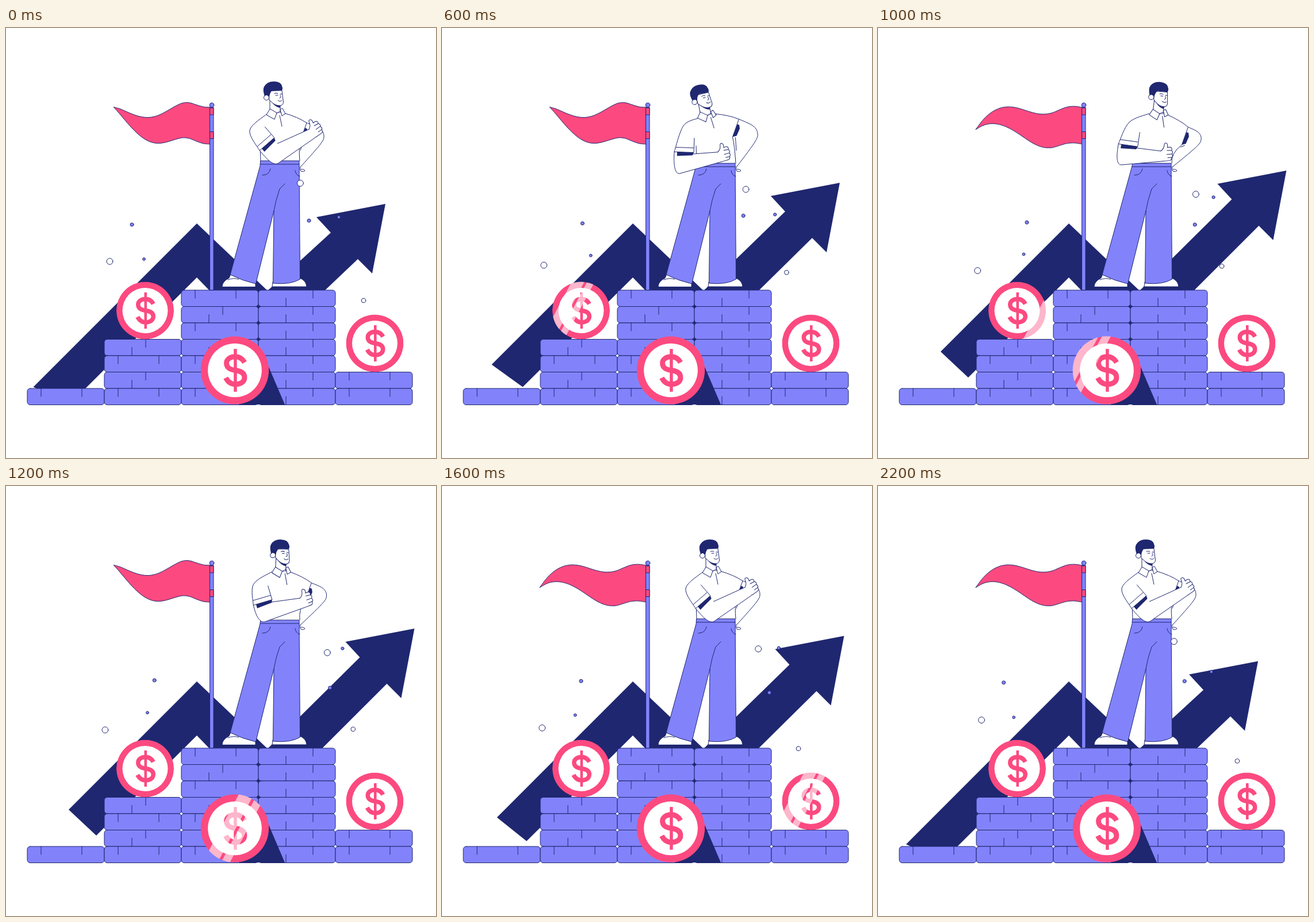
An HTML page that plays this animation: 748x748 px, repeating every 2300 ms.

```html
<!DOCTYPE html>
<html lang="en">
<head>
<meta charset="utf-8">
<title>Success podium</title>
<style>
  html, body { margin: 0; width: 100%; height: 100%; overflow: hidden; background: #fff; }
  svg { display: block; width: 100vw; height: 100vh; }
</style>
</head>
<body>
<svg id="stage" viewBox="0 0 748 748" stroke-linejoin="round" stroke-linecap="round"></svg>
<script>
const NAVY = '#1f2770', BLUE = '#8283fb', PINK = '#fc4a80', WHITE = '#fff';
const LOOP = 2300, STEP = 100, TAU = Math.PI * 2;
const stage = document.getElementById('stage');

function add(tag, attrs, parent = stage) {
  const el = document.createElementNS('http://www.w3.org/2000/svg', tag);
  for (const name in attrs) el.setAttribute(name, attrs[name]);
  parent.appendChild(el);
  return el;
}
const shape = (fill, d = '', parent = stage) => add('path', { fill, d, stroke: NAVY }, parent);
const solid = (fill, d = '', parent = stage) => add('path', { fill, d }, parent);
const line = (d = '', parent = stage) => shape('none', d, parent);
const draw = (el, d) => el.setAttribute('d', d);
const move = (el, [x, y], angle = 0) =>
  el.setAttribute('transform', `translate(${x} ${y}) rotate(${angle})`);

const mix = (a, b, k) => [a[0] + (b[0] - a[0]) * k, a[1] + (b[1] - a[1]) * k];
const plus = (a, b, k = 1) => [a[0] + b[0] * k, a[1] + b[1] * k];
function turn([x, y], degrees) {
  const a = degrees * TAU / 360, c = Math.cos(a), s = Math.sin(a);
  return [x * c - y * s, x * s + y * c];
}
function smooth(t, from, length) {
  const u = Math.min(1, Math.max(0, (t - from) / length));
  return u * u * u * (10 + u * (6 * u - 15));
}

// Periodic monotone cubic through keyed values.
function ease(values, times, t) {
  const n = times.length;
  const time = i => times[(i + n) % n] + Math.floor(i / n) * LOOP;
  const value = i => values[(i + n) % n];
  const rate = i => (value(i + 1) - value(i)) / (time(i + 1) - time(i));
  const slope = i => {
    const a = rate(i - 1), b = rate(i);
    return a * b <= 0 ? 0 : 2 * a * b / (a + b);
  };
  let i = n - 1;
  while (times[i] > t) i--;
  const h = time(i + 1) - time(i), u = (t - time(i)) / h, v = 1 - u;
  return v * v * (1 + 2 * u) * value(i) + u * u * (3 - 2 * u) * value(i + 1)
    + h * u * v * (v * slope(i) - u * slope(i + 1));
}

// Smooth curve through points, continuing from the first one.
function curve(points) {
  let d = '';
  for (let i = 0; i < points.length - 1; i++) {
    const a = points[i], b = points[i + 1];
    const before = points[i - 1] || a, after = points[i + 2] || b;
    const c1 = plus(a, plus(b, before, -1), 1 / 6);
    const c2 = plus(b, plus(after, a, -1), -1 / 6);
    d += `C${c1} ${c2} ${b}`;
  }
  return d;
}

/* Arrow: stretches up to the right, then shrinks back */
const HEAD = [[565, 356], [540, 329], [660, 306], [637, 427], [612, 402]];
const arrow = solid(NAVY);
function drawArrow(t) {
  const k = smooth(t, 0, 1050) - smooth(t, 1210, 1150);
  const head = HEAD.map(p => plus(p, [50.5, -58], k));
  const tailTop = plus([47.5, 624.5], [61.5, -61.5], k);
  const tailLow = plus([112, 653], [45, -45], k);
  draw(arrow, `M${[tailTop, [332, 340], [455, 457], ...head, [450, 556], [332, 434], tailLow].join('L')}Z`);
}

/* Bricks */
[1, 4, 7, 7, 2].forEach((count, column) => {
  const x = 37 + column * 134;
  for (let row = 7 - count; row < 7; row++) {
    const y = 456 + row * 28.5;
    add('rect', { x, y, width: 134, height: 28.5, rx: 5, fill: BLUE, stroke: NAVY });
    const top = dx => `M${x + dx} ${y}v14`;
    const bottom = dx => `M${x + dx} ${y + 14}v14`;
    if (column === 3) line(top(95) + bottom(48));
    else line(row % 2 && column < 4 ? bottom(48) + top(72) : top(24) + top(95));
  }
});
solid(NAVY, 'M452 578L485 655H405Z');

/* Coins, each crossed in turn by a slanted shine */
const DOLLAR = 'M13.5-11.5C10-18 5-20 0-20C-8-20-13-16-13-10.5C-13-3-7-1 0 0'
  + 'C8 1 13.5 4 13.5 10.5C13.5 16.5 8 20.5 0 20.5C-7 20.5-11 17-14 11';
add('circle', { r: 50 }, add('clipPath', { id: 'coin' }));
function makeCoin(x, y, r) {
  const coin = add('g', { transform: `translate(${x} ${y}) scale(${r / 50})`, 'clip-path': 'url(#coin)' });
  add('circle', { r: 50, fill: PINK }, coin);
  add('circle', { r: 39.5, fill: WHITE }, coin);
  const sign = add('g', { transform: 'translate(.8 0)', fill: 'none', stroke: PINK, 'stroke-linecap': 'butt' }, coin);
  add('path', { d: DOLLAR, 'stroke-width': 7.5 }, sign);
  add('path', { d: 'M0-31.5V31.5', 'stroke-width': 4.6 }, sign);
  return add('path', { d: 'M0-60V60H-13V-60ZM-18-60V60H-40V-60Z', fill: WHITE, opacity: .6 }, coin);
}
const shines = [makeCoin(242, 491.5, 50), makeCoin(398, 595.5, 59.3), makeCoin(641.5, 548.5, 50)];
function drawShines(t) {
  shines.forEach((shine, i) => {
    const x = -43 + .2 * (t - 400 - i * 488);
    shine.setAttribute('transform', `skewX(-28) translate(${x} 0)`);
  });
}

/* Flag: a wave running from the pole to the tip */
const flag = shape(PINK);
add('rect', { x: 355, y: 138, width: 6, height: 318, fill: BLUE, stroke: NAVY });
for (const y of [139, 180.5]) add('rect', { x: 355, y, width: 6, height: 12, fill: PINK, stroke: NAVY });
add('circle', { cx: 358, cy: 134, r: 3.8, fill: BLUE, stroke: NAVY });
function drawFlag(t) {
  const phase = t / 600, top = [], bottom = [], parts = 14;
  const tip = 178.5 + 10 * Math.cos(TAU * phase - Math.PI / 6);
  for (let i = 0; i <= parts; i++) {
    const u = i / parts, x = 355 + (tip - 355) * u;
    const swing = 10 * Math.min(1, 4 * u) + 14 * u ** 8;
    const y = 170 - 9 * u * u - swing * Math.cos(TAU * ((u - .22) / .757 - phase));
    const half = 32 * (1 - u ** 2.3);
    top.push([x, y - half]);
    bottom.unshift([x, y + half]);
  }
  draw(flag, `M${top[0]}${curve(top)}${curve(bottom)}Z`);
}

/* Man: a few joints per pose, the rest is derived from them */
const crossed = {
  collar: [470, 147], shoulder: [424, 178], cuff: [454, 202], elbow: [474, 235],
  hand: [537, 173], farElbow: [553, 188], lean: [0], cuffTilt: [-41]
};
const lowered = {
  collar: [458, 154], shoulder: [416, 184], cuff: [435, 217], elbow: [442, 259],
  hand: [508, 208], farElbow: [546, 182], lean: [-14], cuffTilt: [-16]
};
const leaning = {
  collar: [461, 151], shoulder: [420, 170], cuff: [421, 216], elbow: [414, 253],
  hand: [490, 216], farElbow: [549, 184], lean: [-11], cuffTilt: [2]
};
const upright = {
  collar: [489, 148], shoulder: [437, 164], cuff: [435, 204], elbow: [424, 238],
  hand: [502, 216], farElbow: [562, 194], lean: [7], cuffTilt: [8]
};
const POSES = [crossed, lowered, leaning, upright, crossed];
const POSE_TIMES = [0, 400, 600, 1000, 1400];
const HIP = [513, 241];

shape(WHITE, 'M376 450Q376 441 388 435L391 428L434 443L434 450Z');
line('M386 438Q395 434 405 437');
shape(WHITE, 'M464 442L463 450H523Q522 439 511 435Z');

const farArm = shape(WHITE), farInner = line();
shape(WHITE, 'M512 241Q511 247 513 249Q518 251 520 248Q518 245 513 246');
const headGroup = add('g', {});
const torso = solid(WHITE), torsoSides = line(), farShade = solid(NAVY);
const trousers = shape(BLUE), belt = line();
line('M485 271L476 280Q469 300 466 318');
line('M446 256Q458 256 460 245M503 248Q504 256 511 258');
const collarGroup = add('g', {});
const forearm = shape(WHITE), sleeve = shape(WHITE), hem = line(), shade = solid(NAVY);
const handGroup = add('g', {});

shape(WHITE, 'M-5 8V33H13V18', headGroup);
solid(NAVY, 'M-1 15Q6 21 13 20V24Q4 22-1 15Z', headGroup);
shape(WHITE, 'M-7-5L-6 10L-3 13Q4 20 12 20Q18 20 18.5 14L17.5 6L16-6Z', headGroup);
add('circle', { cx: -11, cy: 6, r: 4.5, fill: WHITE, stroke: NAVY }, headGroup);
solid(NAVY, 'M-14 4Q-18-8-15-13Q-10-22 2-22Q14-22 16-14Q18-10 16-6H-1Q-5-3-6 5Q-9 1-12 2Z', headGroup);
line('M3-1Q6-3 9-1M5 2H9M13 0H16M13 2Q16 6 12 7M9 11Q13 14 16 11', headGroup);

shape(WHITE, 'M-11-6L-17 4L-3 12L1 1Z', collarGroup);
shape(WHITE, 'M7-5L10 6L16 2L11-7Z', collarGroup);
line('M1 1L7-2M6 5L10 24', collarGroup);

shape(WHITE, 'M-10-3Q-4-6-3-12Q-2-18 2-15Q4-12 2-8L7-8Q11-7 9-2Q12 1 9 4Q11 8 8 10Q8 15 3 15L-8 15', handGroup);
line('M9-2L1-3M9 4H0M8 10H1', handGroup);

function poseAt(t) {
  const pose = {};
  for (const joint in crossed)
    pose[joint] = crossed[joint].map((_, i) => ease(POSES.map(p => p[joint][i]), POSE_TIMES, t));
  return pose;
}

function drawMan(t) {
  const { collar, shoulder, cuff, elbow, hand, farElbow, lean: [lean], cuffTilt: [tilt] } = poseAt(t);
  const waist = 231 + (hand[1] - 173) / 10;
  const fromCollar = (x, y) => plus(collar, turn([x, y], lean));
  const fromCuff = (x, y) => plus(cuff, turn([x, y], tilt));

  move(headGroup, fromCollar(-6, -32), lean);
  move(collarGroup, collar, lean / 2);

  const neck = fromCollar(-17, 3), farShoulder = fromCollar(53, 18);
  const farCuff = plus(farShoulder, [-11, 31]);
  const farTop = plus(mix(farShoulder, farElbow, .7), [2, -6]);
  const farBend = plus(mix(farElbow, HIP, .25), [3, 2]);
  const fromFarCuff = (k, dx) => plus(mix(farShoulder, farCuff, k), [dx, 1]);
  draw(farArm, `M${farShoulder}${curve([farShoulder, farTop, farElbow, farBend, HIP])}`);
  draw(farInner, `M${fromFarCuff(1, 5)}L512 213`);
  draw(farShade, `M${fromFarCuff(.25, 0)}L${fromFarCuff(.3, 4)}L${fromFarCuff(.5, 7)}L${fromFarCuff(.9, 6)}L${farCuff}Z`);

  const cuffOut = fromCuff(-17, 0), cuffIn = fromCuff(17, 0), armpit = fromCuff(17, -25);
  draw(torso, `M${neck}L${armpit}L442 205L443 ${waist}H511L${farCuff}L${farShoulder}L${fromCollar(14, 0)}Z`);
  draw(torsoSides, `M442 205L443 ${waist}M${fromCollar(14, 1)}Q${fromCollar(38, 8)} ${farShoulder}`
    + `L${farCuff}Q509 ${farCuff[1] + 15} 511 ${waist}`);
  draw(trousers, `M443 ${waist}H510L510.5 300L511.5 437Q495 447 464.5 444L466 318L434.5 445Q412 440 390 429L442 240Z`);
  draw(belt, `M442 ${waist + 6}H510`);

  const reach = plus(hand, elbow, -1);
  const armAngle = Math.atan2(reach[1], reach[0]) * 360 / TAU + 10;
  const fromElbow = (x, y) => plus(elbow, turn([x, y], armAngle));
  const fromHand = (x, y) => plus(hand, turn([x, y], armAngle));
  draw(forearm, `M${cuffOut}L${fromCuff(-17, 10)}C${fromCuff(-17, 19)} ${fromElbow(-10, 0)} ${elbow}`
    + `L${fromHand(-8, 15)}L${hand}L${fromHand(-10, -3)}L${fromElbow(18, -29)}`);
  move(handGroup, hand, armAngle);

  draw(sleeve, `M${neck}${curve([neck, shoulder, cuffOut])}L${cuffIn}L${armpit}`);
  draw(hem, `M${fromCuff(-15, -8)}L${fromCuff(16, -8)}`);
  draw(shade, `M${fromCuff(-12, 0)}L${cuffIn}L${fromCuff(15, 5)}Q${fromCuff(0, 6)} ${fromCuff(-12, 7)}Z`);
}

/* Dots drifting along ellipses: centre, cosine and sine offsets */
const dots = [
  [3, BLUE, [239, 340], [-20, 2], [4, 0]],
  [2.4, BLUE, [244, 398], [-4, 4], [14.5, -2]],
  [5.4, WHITE, [176.5, 415], [4, -9], [1, -3]],
  [5.4, WHITE, [535, 280], [-23, -10], [-8, 0]],
  [3, BLUE, [544, 342], [-17, -7], [-21, -16]],
  [2.6, BLUE, [582, 307], [-3, 22], [-3, 19]],
  [3.8, WHITE, [612, 447], [10, 27], [-12, -20]]
].map(([r, fill, centre, cosine, sine]) =>
  ({ el: add('circle', { r, fill, stroke: NAVY }), centre, cosine, sine }));
function drawDots(t) {
  const a = TAU * t / LOOP;
  for (const { el, centre, cosine, sine } of dots)
    move(el, plus(plus(centre, cosine, Math.cos(a)), sine, Math.sin(a)));
}

const start = performance.now();
function tick() {
  const t = Math.floor((performance.now() - start) % LOOP / STEP) * STEP;
  for (const part of [drawArrow, drawShines, drawFlag, drawMan, drawDots]) part(t);
  requestAnimationFrame(tick);
}
tick();
</script>
</body>
</html>
```
